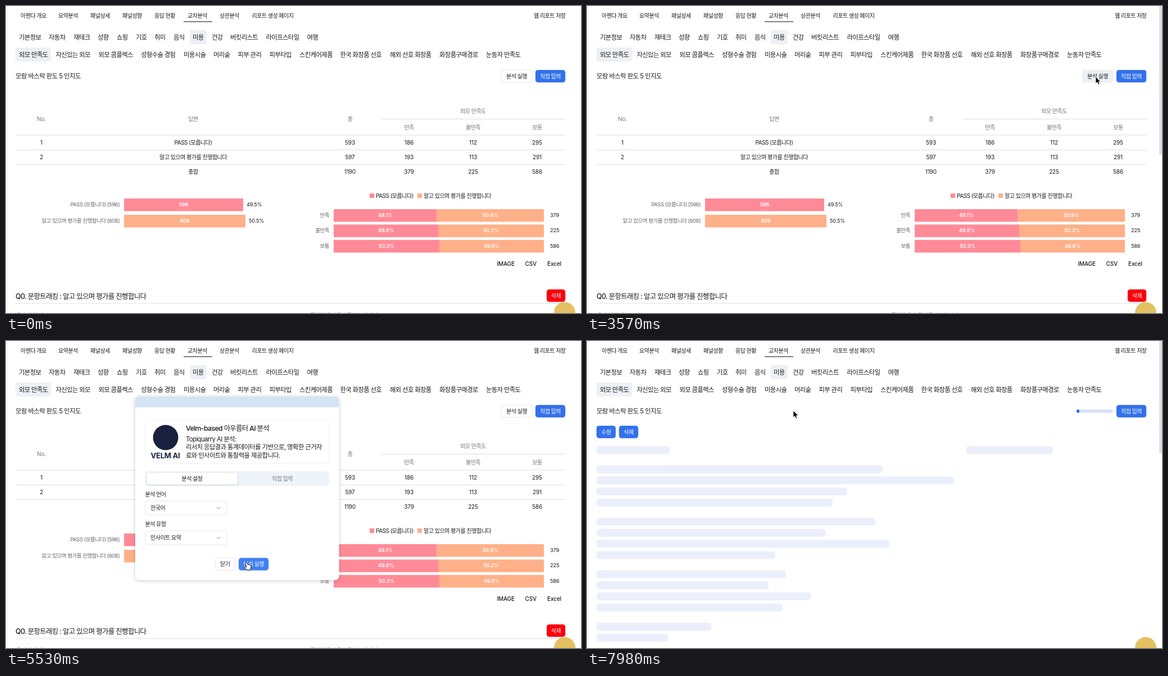
Recreate the animation shown at these times as an HTML page. Size 1023x547 px, loop 8 s.

```html
<!DOCTYPE html>
<html lang="ko">
<head>
<meta charset="utf-8">
<style>
  html, body { margin: 0; width: 100%; height: 100%; overflow: hidden; background: #fff; }
  svg { display: block; width: 100vw; height: 100vh; }
  text { font-family: Inter, "Noto Sans CJK KR", "Noto Sans CJK", sans-serif; white-space: pre; }
</style>
</head>
<body>
<svg id="stage" viewBox="0 0 1023 547" xmlns="http://www.w3.org/2000/svg">
  <defs>
    <filter id="soft" x="-20%" y="-20%" width="140%" height="150%">
      <feDropShadow dx="0" dy="1" stdDeviation="1.5" flood-color="#203050" flood-opacity=".2"/>
    </filter>
    <filter id="lift" x="-10%" y="-10%" width="120%" height="120%">
      <feDropShadow dx="0" dy="1" stdDeviation="3" flood-color="#203050" flood-opacity=".25"/>
    </filter>
  </defs>
</svg>
<script>
const LOOP = 8000, TICK = 70;
const INK = '#18191c', GRAY = '#75777b', BLUE = '#3371eb', HOVER = '#edf0f5';
const PINK = '#ff8a97', ORANGE = '#ffb088', LINE = '#dedfe1', SKELETON = '#ebeffc';
const stage = document.getElementById('stage');

function add(parent, tag, attrs, content) {
  const node = document.createElementNS('http://www.w3.org/2000/svg', tag);
  for (const key in attrs) node.setAttribute(key, attrs[key]);
  if (content) node.textContent = content;
  return parent.appendChild(node);
}
const group = (parent = stage) => add(parent, 'g', {});

// Rectangles are given by their edges, text by its left edge and vertical middle.
function box(parent, x1, y1, x2, y2, fill, rx = 0, more = {}) {
  return add(parent, 'rect', { x: x1, y: y1, width: x2 - x1, height: y2 - y1, fill, rx, ...more });
}
function label(parent, x, y, string, { size = 10, fill = INK, weight = 400, anchor = 'start', ...more } = {}) {
  const spacing = /[가-힣]/.test(string) ? -0.05 * size : -0.015 * size;
  return add(parent, 'text', {
    x, y: y + size * 0.36, 'font-size': size, fill, 'font-weight': weight,
    'text-anchor': anchor, 'letter-spacing': spacing, ...more
  }, string);
}
const centered = (parent, x, y, string, style = {}) => label(parent, x, y, string, { anchor: 'middle', ...style });
const rule = (parent, x1, x2, y) => box(parent, x1, y - 0.5, x2, y + 0.5, LINE);

function button(parent, x1, y1, x2, y2, string, fill) {
  const plain = fill === '#fff';
  const face = box(parent, x1, y1, x2, y2, fill, 4.5, plain ? { stroke: '#e4e5e8' } : { filter: 'url(#soft)' });
  centered(parent, (x1 + x2) / 2, (y1 + y2) / 2, string, { fill: plain ? INK : '#fff', weight: 500 });
  return face;
}

function drawHeader(g) {
  box(g, 2, 0, 3, 547, '#efeff0');
  [[26, '아젠다 개요'], [93, '요약분석'], [150, '패널상세'], [207, '패널성향'], [264, '응답 현황'],
   [323, '교차분석'], [380, '상관분석'], [437.5, '리포트 생성 페이지'], [939, '웹 리포트 저장']]
    .forEach(([x, s]) => label(g, x, 17, s, { weight: 500 }));
  box(g, 316, 27, 367, 28.7, '#6c6d70');
  box(g, 327, 43, 357, 68, '#edf0f5', 4);
  box(g, 17, 74, 80, 99, '#edf0f5', 4);
  [[23, '기본정보'], [76, '자동차'], [120, '재테크'], [163, '성향'], [197, '쇼핑'], [231, '기호'],
   [264, '취미'], [298, '음식'], [332, '미용'], [366, '건강'], [399, '버킷리스트'],
   [462.5, '라이프스타일'], [535.5, '여행']]
    .forEach(([x, s]) => label(g, x, 55.5, s, { size: 11.3, weight: 500 }));
  [[23, '외모 만족도'], [88.5, '자신있는 외모'], [164.5, '외모 콤플렉스'], [240, '성형수술 경험'],
   [316, '미용시술'], [369, '머리숱'], [412.5, '피부 관리'], [468.5, '피부타입'], [522, '스킨케어제품'],
   [594.5, '한국 화장품 선호'], [683, '해외 선호 화장품'], [771, '화장품구매경로'], [854, '눈동자 만족도']]
    .forEach(([x, s]) => label(g, x, 86.5, s, { size: 11.3, weight: 500 }));
  label(g, 17, 125, '모람 바스락 판도 5 인지도', { size: 11.4 });
  button(g, 942, 114, 995, 136, '직접 입력', BLUE);
}

function drawTable(g) {
  const columns = [63, 333, 612, 717, 831, 945];
  const head = { fill: GRAY };
  ['No.', '답변', '총'].forEach((s, i) => centered(g, columns[i], 201, s, head));
  centered(g, 831, 187, '외모 만족도', head);
  ['만족', '불만족', '보통'].forEach((s, i) => centered(g, columns[i + 3], 216, s, head));
  rule(g, 668, 995, 201.5);
  [230, 256.5, 282.5].forEach(y => rule(g, 17, 995, y));
  [['1', 'PASS (모릅니다)', 593, 186, 112, 295],
   ['2', '알고 있으며 평가를 진행합니다', 597, 193, 113, 291],
   ['', '총합', 1190, 379, 225, 586]].forEach((row, r) =>
    row.forEach((s, c) => centered(g, columns[c], 243 + r * 26.3, String(s))));
}

function drawCharts(g) {
  const white = { fill: '#fff', weight: 600, size: 9 };
  const side = { fill: '#65676b', size: 9.5, anchor: 'end' };
  [['PASS (모릅니다) [596]', '596', 422, '49.5%', PINK],
   ['알고 있으며 평가를 진행합니다 [608]', '608', 426, '50.5%', ORANGE]]
    .forEach(([name, count, end, share, color], i) => {
      const y = 353.5 + i * 29;
      label(g, 202, y, name, side);
      box(g, 210, y - 10.5, end, y + 12, color);
      centered(g, (210 + end) / 2, y, count, white);
      label(g, end + 6, y, share, { size: 9.1 });
    });

  box(g, 647, 334, 655, 342, PINK);
  label(g, 658, 338, 'PASS (모릅니다)');
  box(g, 732, 334, 740, 342, ORANGE);
  label(g, 743, 338, '알고 있으며 평가를 진행합니다');
  [['만족', '49.1%', '50.9%', 379, 766.5], ['불만족', '49.8%', '50.2%', 225, 769],
   ['보통', '50.3%', '49.6%', 586, 771]].forEach(([name, left, right, total, split], i) => {
    const y = 372.5 + i * 27.4;
    label(g, 575, y, name, side);
    box(g, 583, y - 10.5, split, y + 12, PINK);
    box(g, split, y - 10.5, 957, y + 12, ORANGE);
    centered(g, (583 + split) / 2, y, left, white);
    centered(g, (split + 957) / 2, y, right, white);
    label(g, 968, y, String(total), { size: 9.2 });
  });
  [[873.5, 'IMAGE'], [923.5, 'CSV'], [963, 'Excel']].forEach(([x, s]) => label(g, x, 459, s, { weight: 500 }));
}

function drawNextQuestion(g) {
  label(g, 17, 518, 'Q0. 문항트래킹 : 알고 있으며 평가를 진행합니다', { size: 12.4, weight: 500 });
  rule(g, 17, 995, 530);
  button(g, 962, 505, 995, 527, '삭제', '#fb0007');
  label(g, 18, 551, '응답 현황 개요', { fill: GRAY });
  label(g, 541, 551, '문항별 응답 결과를 비교합니다', { fill: GRAY });
}

function drawSkeleton(g) {
  button(g, 17, 151, 51, 173, '수정', BLUE);
  button(g, 57, 151, 91, 173, '삭제', BLUE);
  box(g, 17, 187.5, 147, 201.5, SKELETON, 5);
  box(g, 674.5, 187.5, 828.5, 201.5, SKELETON, 5);
  [526, 653, 463, 437, 513, 424, 539, 335, 354, 323, 399, 348, 221, 144].forEach((end, i) => {
    const y = 221.5 + Math.floor(i / 4) * 93.5 + (i % 4) * 19.8;
    box(g, 17, y, end, y + 14, SKELETON, 5);
  });
  box(g, 871, 122, 936, 128, '#d5e4f5', 3);
}

function drawDialog(g) {
  box(g, 230, 99, 592.5, 426, '#fff', 7, { filter: 'url(#lift)' });
  add(g, 'path', { d: 'M230 118V106Q230 99 237 99H585.5Q592.5 99 592.5 106V118Z', fill: '#d4e4f4' });
  box(g, 247.5, 141.5, 575, 218, '#fff', 6, { stroke: '#eff0f2' });
  add(g, 'circle', { cx: 284, cy: 172, r: 22.5, fill: '#182140' });
  centered(g, 283.5, 204.5, 'VELM AI', { size: 13, weight: 700, fill: '#182140' });
  label(g, 320, 156, 'Velm-based 아우름터 AI 분석', { size: 12.3, weight: 500 });
  ['Topiquarry AI 분석:', '리서치 응답결과 통계데이터를 기반으로, 명확한 근거자', '료와 인사이트와 통찰력을 제공합니다.']
    .forEach((s, i) => label(g, 320, 174.5 + i * 14.8, s, { size: 11.3 }));

  box(g, 247.5, 232, 575, 258, '#eff3fa', 5);
  box(g, 250, 235, 412, 255.5, '#fff', 4, { filter: 'url(#soft)' });
  centered(g, 331, 245, '분석 설정', { weight: 500 });
  centered(g, 491.5, 245, '직접 입력', { weight: 500, fill: GRAY });

  [['분석 언어', '한국어', 273], ['분석 유형', '인사이트 요약', 326]].forEach(([name, value, y]) => {
    label(g, 247.5, y, name, { weight: 500 });
    box(g, 248, y + 12, 393, y + 37, '#fff', 4, { stroke: '#e5e6e9' });
    label(g, 257, y + 24.5, value);
    add(g, 'path', { d: `M375 ${y + 23}l3.3 3.3 3.3-3.3`, fill: 'none', stroke: '#8a8c90' });
  });
  button(g, 372, 386.5, 407.5, 408.5, '닫기', '#fff');
  return button(g, 414, 386.5, 467, 408.5, '분석 실행', BLUE);
}

const header = group();
drawHeader(header);
const runButton = group();
const runFace = button(runButton, 881, 114, 936, 136, '분석 실행', '#fff');
const results = group();
drawTable(results);
drawCharts(results);
drawNextQuestion(results);
const skeleton = group();
drawSkeleton(skeleton);
const progress = box(skeleton, 871, 122, 871, 128, '#3069d6', 2.5);
const scrollbar = box(stage, 1018, 0, 1023, 265, '#dfdfe0', 1);
add(stage, 'circle', { cx: 994, cy: 546.5, r: 19, fill: '#e3c163' });
const dialog = group();
const confirmFace = drawDialog(dialog);

const arrow = add(stage, 'path', {
  d: 'M0 0V12.2L2.8 9.7 4.9 14.2 7 13.2 5 8.9H8.8Z', fill: '#000', stroke: '#fff', 'stroke-width': .8
});
const hand = add(stage, 'path', {
  d: 'M-2.2 1.6Q-1.4-.8.3.8L2.3 5Q3.4 3.6 4.5 4.9 5.8 4 6.4 5.5 8 5.2 8 7.2L7.8 10.6 6.6 14H.8L-3.6 9.9Q-4.4 7.8-2.4 8.1L-.2 9.2Z',
  fill: '#fff', stroke: '#111', 'stroke-width': 1, 'stroke-linejoin': 'round'
});

// Pointer stops: time, x, y.
const stops = [
  [490, 812, 286], [1120, 930, 142], [1190, 930, 142], [1470, 947, 136], [2030, 951, 129],
  [2870, 901, 130], [3360, 905, 126], [3850, 905, 126], [4690, 426, 392], [4900, 426, 392],
  [5180, 417, 386], [5530, 428, 394], [5810, 428, 394], [6090, 413, 260], [6650, 413, 260],
  [7490, 407, 176], [7980, 367, 124]
];
function pointerAt(t) {
  const next = stops.findIndex(s => s[0] > t);
  if (next < 1) return (next ? stops.at(-1) : stops[0]).slice(1);
  const [t0, x0, y0] = stops[next - 1], [t1, x1, y1] = stops[next];
  const p = (t - t0) / (t1 - t0), k = p * p * (3 - 2 * p);
  return [x0 + (x1 - x0) * k, y0 + (y1 - y0) * k];
}

const within = (t, from, to) => t >= from && t < to;
const show = (node, visible) => node.setAttribute('visibility', visible ? 'visible' : 'hidden');

function render(time) {
  const t = Math.floor(time / TICK) * TICK;
  const loading = t >= 6300;
  show(results, !loading);
  show(runButton, !loading);
  show(skeleton, loading);
  progress.setAttribute('width', Math.max(0, (t - 6300) / 1680 * 5));

  const hovered = within(t, 2450, 3640);
  runFace.setAttribute('fill', hovered ? HOVER : '#fff');
  runFace.setAttribute('stroke', hovered ? HOVER : '#e4e5e8');
  confirmFace.setAttribute('fill', within(t, 4550, 5600) ? '#4080f0' : BLUE);

  show(dialog, within(t, 3640, 5670));
  dialog.setAttribute('opacity', t === 3640 || t === 5600 ? 0.5 : 1);
  show(scrollbar, t >= 1260 && !within(t, 3640, 5600));
  scrollbar.setAttribute('height', loading ? 200 : 265);

  const pointing = within(t, 1260, 3360) || within(t, 4550, 5600);
  const [x, y] = pointerAt(t);
  show(hand, pointing);
  show(arrow, t >= 490 && !pointing);
  for (const cursor of [hand, arrow]) cursor.setAttribute('transform', `translate(${x} ${y})`);
}

function frame() {
  render(performance.now() % LOOP);
  requestAnimationFrame(frame);
}
frame();
</script>
</body>
</html>
```
